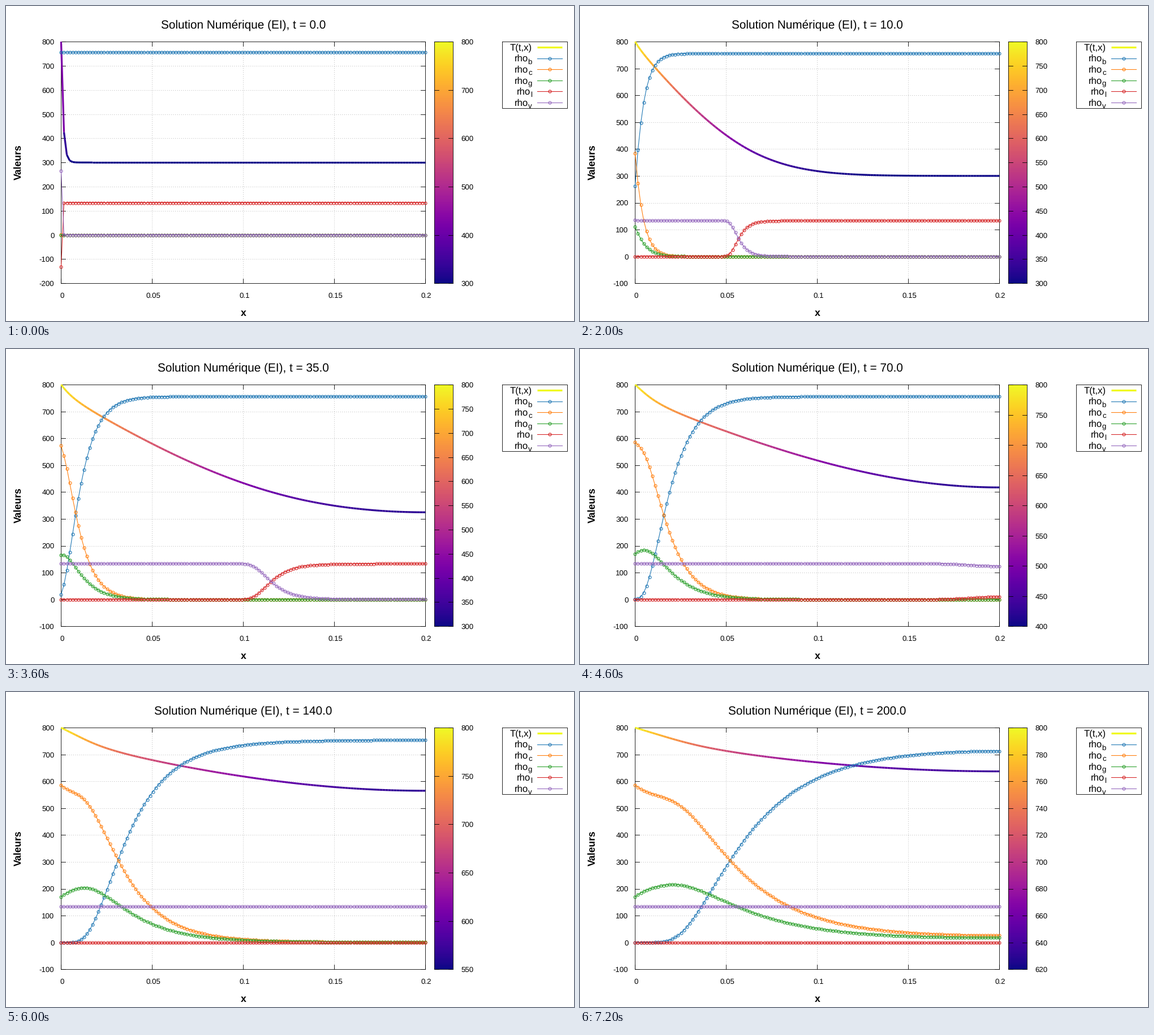
A matplotlib script that plays this animation: 1004 px wide and 558 px high, repeating every 7.4 s.

```python
import math

import matplotlib.pyplot as plt
import numpy as np
from matplotlib.animation import FuncAnimation
from matplotlib.collections import LineCollection

plt.rcParams["font.family"] = "Liberation Sans"
plt.rcParams["text.hinting"] = "none"

W, H, DPI = 1004, 558, 64
PX = 72 / DPI                                   # points per pixel
LEFT, RIGHT, TOP, BOTTOM = 97.4, 741.3, 63.2, 491.2
BAR_L, BAR_R = 757.3, 789.7
TIC = 8
SPECIES = {"b": "#1f77b4", "c": "#ff7f0e", "g": "#2ca02c",
           "l": "#d62728", "v": "#9467bd"}
SUB_EM = {"b": .556, "c": .5, "g": .556, "l": .222, "v": .5}
TIMES = [*range(0, 10), *range(10, 20, 2), *range(20, 50, 5), *range(50, 201, 10)]

# Wood pyrolysis with drying: b -> c, b -> g, l -> v
N, LENGTH = 128, 0.2
DX = LENGTH / (N - 1)
B0, L0 = 755.8, 133.3
T0, T_HOT = 300, 800


def arrhenius(a, energy, temp):
    return a * np.exp(-energy / (8.314 * temp))


def heat_step(u, b, c, l, dt):
    """One implicit Euler step for u = T - T0, hot on the left, insulated right."""
    cond = 0.1046 + (0.255 - 0.1046) * b / (b + c)
    heat = 2.3 * b + 1.1 * c + 4.18 * l + 1.1 * (L0 - l)
    heat[-1] /= 2
    w = (cond[1:] + cond[:-1]) / 2 * dt / DX ** 2
    i = np.arange(N - 1)
    m = np.diag(heat)
    m[i, i] += w
    m[i + 1, i + 1] += w
    m[i, i + 1] -= w
    m[i + 1, i] -= w
    rhs = heat * u
    m[0] = 0
    m[0, 0] = 1
    rhs[0] = T_HOT - T0
    return np.linalg.solve(m, rhs)


def simulate():
    u, c, g = np.zeros(N), np.zeros(N), np.zeros(N)
    b, l = np.full(N, B0), np.full(N, L0)
    # the stiff boundary node rings: it flips sign at every 0.01 s step
    z = 0.01 * arrhenius(5.13e10, 88000, T_HOT)
    ring = (1 - z / 2) / (1 + z / 2)
    states, previous = [], 0
    for t in TIMES:
        dt = 0.01 if t <= 10 else 0.1
        for _ in range(max(1, round((t - previous) / dt))):
            u = heat_step(u, b, c, l, dt)
            temp = T0 + u
            kc = arrhenius(7.38e5, 106500, temp)
            kg = arrhenius(1.44e4, 88600, temp)
            loss = b * (1 - np.exp(-(kc + kg) * dt))
            b = b - loss
            c = c + loss * kc / (kc + kg)
            g = g + loss * kg / (kc + kg)
            l = l * np.exp(-arrhenius(5.13e10, 88000, temp) * dt)
        previous = t
        liquid = l.copy()
        liquid[0] = L0 * ring ** (100 * t + 1)
        states.append({"T": T0 + u, "b": b, "c": c, "g": g,
                       "l": liquid, "v": L0 - liquid})
    return states


STATES = simulate()
X = np.linspace(LEFT, RIGHT, N)

fig = plt.figure(figsize=(W / DPI, H / DPI), dpi=DPI, facecolor="white")
ax = fig.add_axes([0, 0, 1, 1])


def text(x, y, s, px, **kw):
    ax.text(x, y, s, fontsize=px * PX, va="baseline", **kw)


def line(xs, ys, color="black", width=0.85, **kw):
    ax.plot(xs, ys, color=color, lw=width * PX, **kw)


def curve(xs, ys, color, **kw):
    line(xs, ys, color, 1.1, marker="o", ms=5 * PX, mfc="none",
         mew=1.1 * PX, **kw)


def box(x0, y0, x1, y1):
    line([x0, x1, x1, x0, x0], [y0, y0, y1, y1, y0], solid_joinstyle="miter")


def scale(value, low):
    return BOTTOM - (value - low) / (T_HOT - low) * (BOTTOM - TOP)


def tic_step(span):
    power = 10 ** math.floor(math.log10(span))
    density = 20 * power / span
    return power * (0.2 if density > 10 else 0.5 if density > 4 else 1)


def side_tics(x0, x1, y):
    line([x0, x0 + TIC], [y, y])
    line([x1 - TIC, x1], [y, y])


def draw_axes(low):
    for v in range(low, 801, 100):
        y = scale(v, low)
        if low < v < 800:
            line([LEFT, RIGHT], [y, y], "#a6a6a6", 0.9, ls=(0, (1, 3)), zorder=1)
        side_tics(LEFT, RIGHT, y)
        text(85.4, y + 4.8, str(v), 13.3, ha="right")
    for i, label in enumerate(["0", "0.05", "0.1", "0.15", "0.2"]):
        x = LEFT + (RIGHT - LEFT) * i / 4
        if 0 < i < 4:
            line([x, x], [TOP, BOTTOM], "#a6a6a6", 0.9, ls=(0, (1, 3)), zorder=1)
        line([x, x], [TOP, TOP + TIC])
        line([x, x], [BOTTOM - TIC, BOTTOM])
        text(x + 1.9, 517, label, 13.3, ha="center")
    box(LEFT, TOP, RIGHT, BOTTOM)
    text(419.3, 549.3, "x", 17.6, ha="center", weight="bold")
    text(26.3, 277, "Valeurs", 17.6, ha="center", weight="bold",
         rotation=90, rotation_mode="anchor")


def draw_colorbar(low, step):
    ax.imshow(np.linspace(1, 0, 128)[:, None], cmap="plasma", aspect="auto",
              extent=(BAR_L, BAR_R, BOTTOM, TOP), interpolation="nearest")
    for v in range(low, 801, step):
        y = scale(v, low)
        side_tics(BAR_L, BAR_R, y)
        text(804.8, y + 4.8, str(v), 13.3)
    box(BAR_L, TOP, BAR_R, BOTTOM)


def draw_legend():
    text(930, 78.6, "T(t,x)", 16.7, ha="right")
    line([939, 983], [73, 73], "#f0f921", 3.3, solid_capstyle="butt")
    for row, (name, color) in enumerate(SPECIES.items(), 1):
        y = 73 + 19.6 * row
        sub_x = 930 - SUB_EM[name] * 13.3
        text(sub_x - 1.445 * 16.7, y + 5.6, "rho", 16.7)
        text(sub_x, y + 9.8, name, 13.3)
        curve([939, 961, 983], [y] * 3, color, markevery=[1])
    box(876.7, TOP, 992.3, 180.5)


def draw(frame):
    state = STATES[frame]
    temp = state["T"]
    low = math.floor(min(v.min() for v in state.values()) / 100) * 100
    step = round(tic_step(T_HOT - temp.min()))
    bar_low = math.floor(temp.min() / step) * step

    ax.clear()
    text(419.3, 39.6, f"Solution Numérique (EI), t = {TIMES[frame]:.1f}", 20.8,
         ha="center")
    draw_axes(low)
    draw_colorbar(bar_low, step)
    draw_legend()

    points = np.column_stack([X, scale(temp, low)])
    segments = LineCollection(np.stack([points[:-1], points[1:]], axis=1),
                              cmap="plasma", lw=3.3 * PX, zorder=3)
    segments.set_array(temp[1:])
    segments.set_clim(bar_low, T_HOT)
    ax.add_collection(segments)
    for name, color in SPECIES.items():
        curve(X, scale(state[name], low), color, zorder=4)

    ax.set_xlim(0, W)
    ax.set_ylim(H, 0)
    ax.axis("off")
    return []


anim = FuncAnimation(fig, draw, frames=len(TIMES), interval=200,
                     init_func=lambda: [], repeat=True, repeat_delay=0)
plt.show()
```
